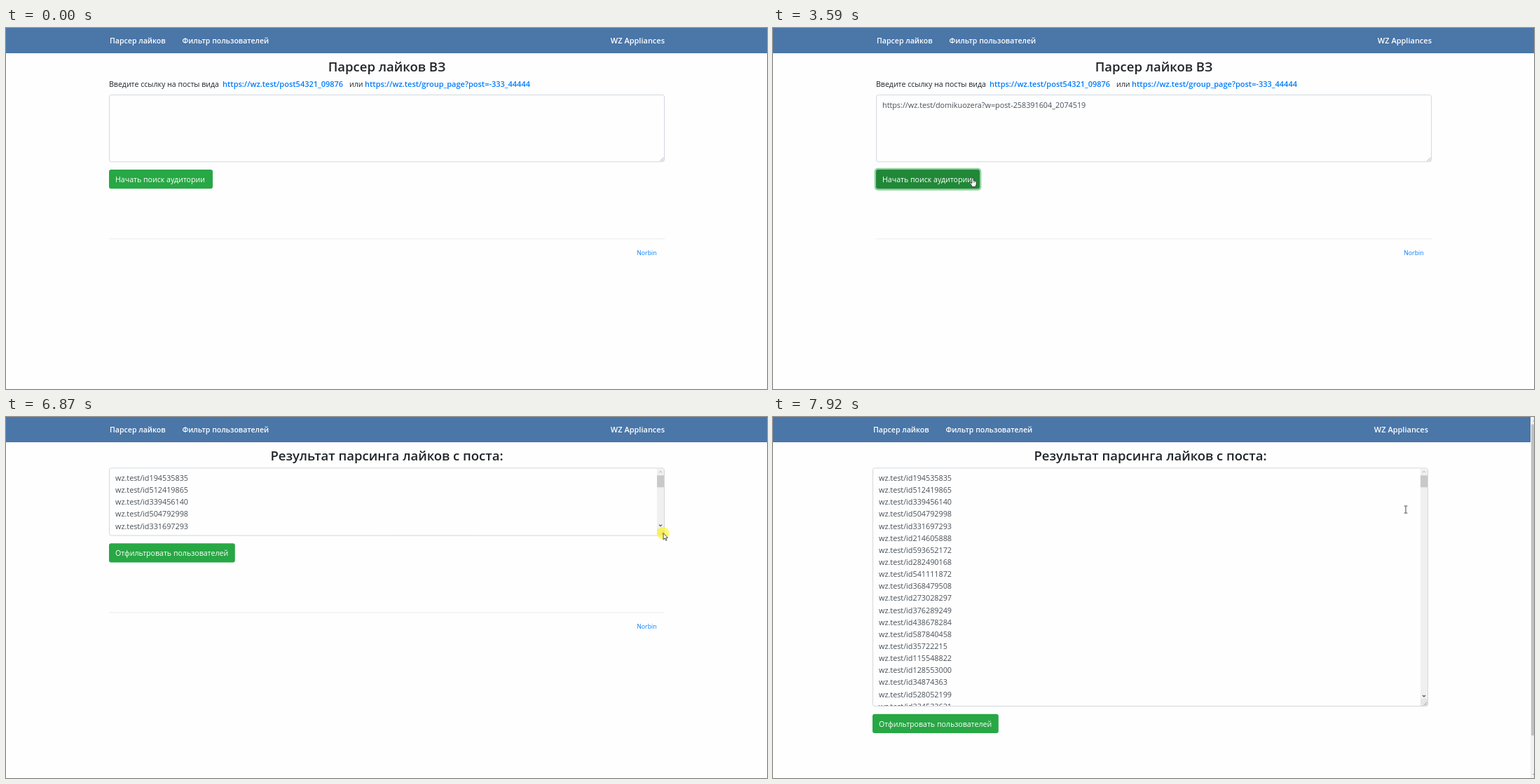
Animation of 1086x515 px, one loop 7990 ms. Source, as an HTML page with a canvas:

```html
<!DOCTYPE html>
<html lang="ru">
<head>
<meta charset="utf-8">
<title>Парсер лайков</title>
<style>
  html, body { margin: 0; width: 100%; height: 100%; overflow: hidden; background: #fefefe; }
  canvas { display: block; width: 1086px; height: 515px; }
</style>
</head>
<body>
<canvas id="stage"></canvas>
<script>
const W = 1086, H = 515, LOOP = 7990;
const LEFT = 147, RIGHT = 940;
const RESULT_AT = 5120;
const FONT = '"Open Sans", "Noto Sans", sans-serif';
const BLUE = '#007bff', INK = '#212529', FIELD_INK = '#495057';

const canvas = document.getElementById('stage');
const dpr = window.devicePixelRatio || 1;
canvas.width = W * dpr;
canvas.height = H * dpr;
const c = canvas.getContext('2d');

// time, x, y of the pointer
const POINTER = [
  [110, 1012, 518], [420, 690, 330], [680, 470, 228], [890, 382, 182],
  [2590, 382, 182], [2830, 282, 175], [3080, 283, 198], [3330, 285, 214],
  [3880, 285, 214], [4120, 340, 196], [4360, 374, 182],
  [5620, 374, 182], [6000, 690, 176], [6370, 978, 167],
  [6590, 978, 167], [6800, 938, 164], [6870, 938, 165],
  [7160, 949, 337], [7360, 950, 400], [7500, 950, 419],
  [7580, 950, 419], [7920, 903, 132]
];
// time, lower edge of the results field
const RESIZE = [[6840, 168], [6870, 169], [7160, 331], [7360, 393], [7500, 413]];
// spans with the mouse button held
const PRESSES = [[1090, 1260], [3400, 3510], [6820, 7560]];

const clamp = v => Math.max(0, Math.min(1, v));
const fade = (t, from, len) => clamp((t - from) / len);
const mix = (a, b, p) => a + (b - a) * p;
const rgb = (a, b, p) => `rgb(${a.map((v, i) => Math.round(mix(v, b[i], p)))})`;

function along(keys, t) {
  if (t <= keys[0][0]) return keys[0].slice(1);
  for (let i = 1; i < keys.length; i++) {
    const a = keys[i - 1], b = keys[i];
    if (t < b[0]) {
      const p = (t - a[0]) / (b[0] - a[0]);
      return a.slice(1).map((v, k) => mix(v, b[k + 1], p));
    }
  }
  return keys[keys.length - 1].slice(1);
}

function makeIds(count) {
  let seed = 7351;
  const next = n => {
    seed = (seed * 16807) % 2147483647;
    return Math.floor(seed / 2147483647 * n);
  };
  return Array.from({ length: count }, (_, i) => {
    let id = String(1 + next(5));
    const len = i === 14 || i === 17 ? 8 : 9;
    while (id.length < len) id += next(10);
    return 'wz.test/id' + id;
  });
}
const IDS = makeIds(22);

function text(str, x, y, size, color, weight = 400, align = 'left') {
  c.font = `${weight} ${size}px ${FONT}`;
  c.textAlign = align;
  c.fillStyle = color;
  c.fillText(str, x, y);
}

function box(x, y, w, h, r, color) {
  c.beginPath();
  c.roundRect(x, y, w, h, r);
  c.fillStyle = color;
  c.fill();
}

function line(color, width, ...pts) {
  c.beginPath();
  pts.forEach(([x, y], i) => i ? c.lineTo(x, y) : c.moveTo(x, y));
  c.strokeStyle = color;
  c.lineWidth = width;
  c.stroke();
}

function rect(x, y, w, h, color) {
  c.fillStyle = color;
  c.fillRect(x, y, w, h);
}

function nav() {
  rect(-10, 0, W + 20, 36, '#4a76a8');
  text('Парсер лайков', 148, 22.3, 10.6, '#fff', 600);
  text('Фильтр пользователей', 251.5, 22.3, 10.5, '#fff', 600);
  text('WZ Appliances', RIGHT, 22.3, 11, '#fff', 600, 'right');
}

function field(top, bottom, border, glow) {
  const w = RIGHT - LEFT, h = bottom - top;
  if (glow > 0) box(LEFT - 2.4, top - 2.4, w + 4.8, h + 4.8, 5, `rgba(0,123,255,${0.27 * glow})`);
  box(LEFT, top, w, h, 3, '#fefefe');
  c.beginPath();
  c.roundRect(LEFT + 0.5, top + 0.5, w - 1, h - 1, 2.8);
  c.strokeStyle = border;
  c.lineWidth = 0.9;
  c.stroke();
}

function grip(bottom) {
  const x = RIGHT - 1.5, y = bottom - 1.5;
  line('#888', 0.7, [x - 5, y], [x, y - 5]);
  line('#888', 0.7, [x - 2.2, y], [x, y - 2.2]);
}

function button(label, bottom, fill, ink, ring, width) {
  const y = bottom + 10.8;
  if (ring > 0) box(LEFT - 2.3, y - 2.3, width + 4.6, 32, 5, `rgba(40,167,69,${0.5 * ring})`);
  box(LEFT, y, width, 27.2, 3, fill);
  text(label, 156, bottom + 28.8, 10.6, ink);
}

function footer(bottom) {
  rect(LEFT, bottom + 109, RIGHT - LEFT, 1, '#ebebeb');
  text('Norbin', 928.5, bottom + 132.2, 8.7, BLUE, 400, 'right');
}

function searchPage(t) {
  const top = 95, bottom = 191.3;
  text('Парсер лайков ВЗ', 543.5, 62, 18.5, INK, 600, 'center');
  text('Введите ссылку на посты вида', LEFT, 84.4, 10.6, INK);
  text('https://wz.test/post54321_09876', 309, 84.4, 11, BLUE, 600);
  text('или', 490, 84.4, 10.6, INK);
  text('https://wz.test/group_page?post=-333_44444', 512, 84.4, 11, BLUE, 600);

  const glow = fade(t, 1090, 150) - fade(t, 3400, 150);
  field(top, bottom, rgb([206, 212, 218], [128, 189, 255], glow), glow);
  grip(bottom);
  const pasted = t >= 1840;
  if (pasted) text('https://wz.test/domikuozera?w=post-258391604_2074519', 156, 114, 10.8, FIELD_INK);
  const caret = (t >= 1170 && t < 1700) || (t >= 1840 && t < 2320) || (t >= 2850 && t < 3380);
  if (caret) rect(pasted ? 451 : 156, 101, 1, 16, '#333');

  const hover = fade(t, 3110, 150) - fade(t, 3960, 150);
  const fill = rgb([40, 167, 69], [33, 136, 56], hover);
  button('Начать поиск аудитории', bottom, fill, '#fff', fade(t, 3420, 130), 148);
  footer(bottom);
}

function innerScroll(top, bottom) {
  const x = 929, end = bottom - 11;
  rect(x, top + 1, 10, bottom - top - 2, '#f0f0f0');
  rect(x, top + 11, 10, 17, '#c9c9c9');
  line('#aaa', 1, [x + 3, top + 7], [x + 5, top + 5], [x + 7, top + 7]);
  line('#505050', 1.2, [x + 3, end - 5], [x + 5, end - 3], [x + 7, end - 5]);
  rect(x, end, 10, 10, '#e6e6e6');
  grip(bottom);
}

function resultPage(t, bottom) {
  const top = 72.3, p = fade(t, RESULT_AT + 35, 85);
  text('Результат парсинга лайков с поста:', 543.5, 62, 18.5, INK, 600, 'center');
  field(top, bottom, rgb([165, 168, 172], [206, 212, 218], p), 0);
  c.save();
  c.beginPath();
  c.rect(LEFT + 1, top + 1, RIGHT - LEFT - 2, bottom - top - 2);
  c.clip();
  IDS.forEach((id, i) => text(id, 156, 91 + i * 17.14, 10.8, FIELD_INK));
  innerScroll(top, bottom);
  c.restore();
  button('Отфильтровать пользователей', bottom,
    rgb([216, 218, 217], [40, 167, 69], p), rgb([33, 37, 41], [255, 255, 255], p), 0, 179.8);
  footer(bottom);
}

function pageScroll(bottom) {
  const x = W - 5, len = 493 * H / (bottom + 159);
  rect(x, 0, 5, H, '#f1f1f1');
  rect(x + 1, 10.5, 4, len, '#c1c1c1');
  line('#a3a3a3', 1, [x + 3.5, 6.5], [W, 5]);
  line('#505050', 1, [x + 3.5, H - 6], [W, H - 4.5]);
}

function shape(pts) {
  c.beginPath();
  pts.forEach(([x, y], i) => i ? c.lineTo(x, y) : c.moveTo(x, y));
  c.closePath();
  c.fillStyle = '#fff';
  c.strokeStyle = '#222';
  c.lineWidth = 0.8;
  c.lineJoin = 'round';
  c.fill();
  c.stroke();
}

const CURSORS = {
  arrow() {
    shape([[0, 0], [0, 9.3], [2.1, 7.4], [3.6, 10.6], [5, 10], [3.6, 6.9], [6.4, 6.7]]);
  },
  beam() {
    line('#333', 0.9, [0, -4.5], [0, 4.5]);
    for (const y of [-5, 5]) line('#333', 0.9, [-2.3, y], [2.3, y]);
  },
  hand() {
    shape([[-1.2, 0.4], [0, -0.4], [1.1, 0.4], [1.2, 4], [3, 4.1], [5, 5], [5.4, 6.3],
      [5, 9.5], [3.8, 12.5], [-0.8, 12.5], [-2.2, 9.5], [-4.2, 7.2], [-3.4, 6.2], [-1.2, 7.6]]);
    for (const x of [1.2, 3]) line('#555', 0.6, [x, 4.5], [x, 7]);
  }
};

function pointer(t, bottom) {
  if (t < 120) return;
  const [x, y] = along(POINTER, t);
  if (PRESSES.some(([a, b]) => t >= a && t < b)) {
    c.beginPath();
    c.arc(x - 0.5, y, 8.8, 0, Math.PI * 2);
    c.fillStyle = 'rgba(255,245,40,0.68)';
    c.fill();
  }
  // the shape only refreshes once the mouse moves again
  const edge = t < 5640 ? 191 : bottom;
  const inField = x > LEFT && x < 925 && y > 73 && y < edge;
  const onButton = t < RESULT_AT && x > LEFT && x < 295 && y > 202 && y < 229;
  c.save();
  c.translate(x, y);
  CURSORS[inField ? 'beam' : onButton ? 'hand' : 'arrow']();
  c.restore();
}

function draw(t) {
  const [bottom] = along(RESIZE, t);
  const overflow = bottom > 356;
  c.setTransform(dpr, 0, 0, dpr, 0, 0);
  rect(0, 0, W, H, '#fefefe');
  c.save();
  if (overflow) c.translate(-5, 0);
  nav();
  if (t < RESULT_AT) searchPage(t);
  else resultPage(t, bottom);
  c.restore();
  if (overflow) pageScroll(bottom);
  pointer(t, bottom);
}

function tick(now) {
  draw(now % LOOP);
  requestAnimationFrame(tick);
}
draw(0);
requestAnimationFrame(tick);
</script>
</body>
</html>
```
